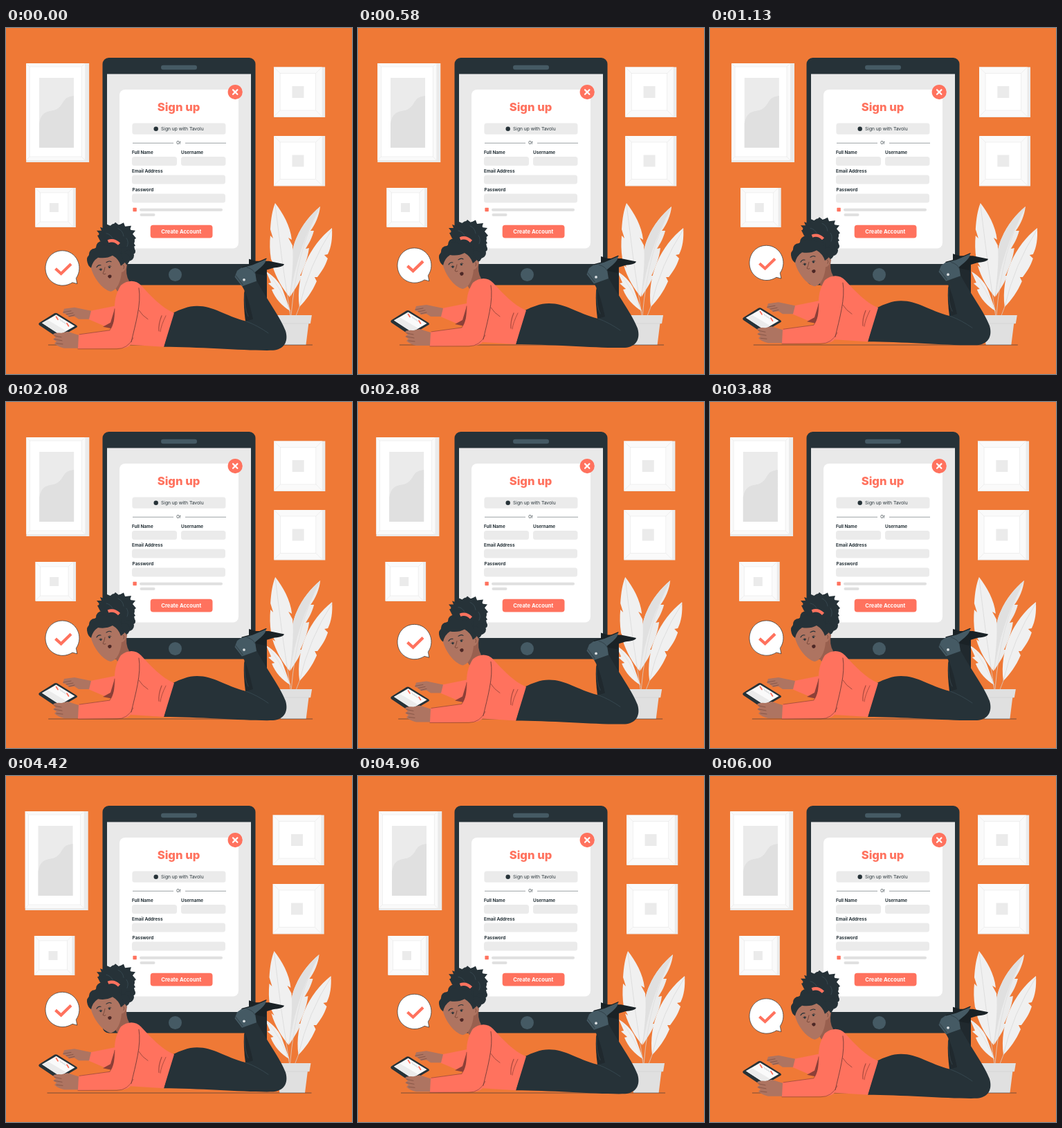
An HTML page with a canvas that plays this animation: 500x500 px, repeating every 6040 ms.

```html
<!DOCTYPE html>
<html lang="en">
<head>
<meta charset="utf-8">
<title>Sign up</title>
<style>
html, body { margin: 0; width: 100%; height: 100%; overflow: hidden; background: #ef7936; }
canvas, svg { position: absolute; left: 0; top: 0; width: 500px; height: 500px; }
text { font-family: Inter, "Open Sans", sans-serif; font-size: 6.4px; font-weight: 700; fill: #263238; }
.title { font-size: 16.6px; font-weight: 800; fill: #ff725e; }
.light { font-size: 6.7px; font-weight: 400; }
.button { font-size: 7.6px; font-weight: 700; fill: #fff; }
.mid { text-anchor: middle; }
</style>
</head>
<body>
<canvas id="stage"></canvas>
<svg viewBox="0 0 500 500">
  <text class="title mid" x="249.5" y="119.6">Sign up</text>
  <text class="light" x="224" y="147.8">Sign up with Tavolu</text>
  <text class="light mid" x="249.5" y="168" style="font-size:5.8px">Or</text>
  <text x="182" y="181.6">Full Name</text>
  <text x="253" y="181.6">Username</text>
  <text x="182" y="209.2">Email Address</text>
  <text x="182.6" y="236">Password</text>
  <text class="button mid" x="253.3" y="296.6">Create Account</text>
</svg>
<script>
const LOOP = 6040, CYCLE = 6000, LEAD = 30;
const DARK = '#263238', SLATE = '#455a64', CORAL = '#ff725e', SKIN = '#ae7461';
const LIGHT = '#ebebeb', GREY = '#e0e0e0', WHITE = '#fff';

const canvas = document.getElementById('stage');
const ctx = canvas.getContext('2d');
const dpr = window.devicePixelRatio || 1;
canvas.width = canvas.height = 500 * dpr;

const cache = {};
const path = d => cache[d] || (cache[d] = new Path2D(d));

function fill(d, color) {
  ctx.fillStyle = color;
  ctx.fill(path(d));
}

function line(d, color, width = 0.6, cap = 'round') {
  ctx.strokeStyle = color;
  ctx.lineWidth = width;
  ctx.lineCap = cap;
  ctx.stroke(path(d));
}

function box(x1, y1, x2, y2, color, r = 0) {
  ctx.fillStyle = color;
  ctx.beginPath();
  ctx.roundRect(x1, y1, x2 - x1, y2 - y1, r);
  ctx.fill();
}

function dot(x, y, r, color) {
  ctx.fillStyle = color;
  ctx.beginPath();
  ctx.arc(x, y, r, 0, Math.PI * 2);
  ctx.fill();
}

// Sideways shake: one stop per tenth of the cycle.
const SWAY = [0, -1, 2, -4, 4, -4, 4, -4, 2, -1, 0];
function swayAt(p) {
  const i = Math.floor(p * 10);
  return SWAY[i] + (SWAY[i + 1] - SWAY[i]) * (p * 10 - i);
}

// Linear rise and fall, twice per cycle.
const floatAt = p => -10 * (1 - Math.abs(1 - 2 * ((p * 2) % 1)));

function shifted(dx, dy, draw) {
  ctx.save();
  ctx.translate(dx, dy);
  draw();
  ctx.restore();
}

function pictureFrame(x, y, w, h, side, base, inset) {
  box(x, y, x + w, y + h, LIGHT);
  box(x, y, x + w - side, y + h - base, '#fafafa');
  const r = x + w - side, b = y + h - base;
  box(x + inset, y + inset, r - inset, b - inset, WHITE);
  ctx.strokeStyle = '#e6e6e6';
  ctx.lineWidth = 0.6;
  ctx.strokeRect(x + inset, y + inset, r - x - 2 * inset, b - y - 2 * inset);
  ctx.beginPath();
  for (const [cx, cy, sx, sy] of [[x, y, 1, 1], [r, y, -1, 1], [x, b, 1, -1], [r, b, -1, -1]]) {
    ctx.moveTo(cx, cy);
    ctx.lineTo(cx + sx * inset, cy + sy * inset);
  }
  ctx.stroke();
}

function drawPictures() {
  pictureFrame(29.2, 51, 91, 143, 6, 3, 5);
  box(48, 72, 98, 173, LIGHT);
  fill('M48 173V138C50 125 56 121 66 119.5C78 118 80 110 84 105C88 99 93 99 98 98V173Z', GREY);
  for (const y of [56.5, 156]) {
    pictureFrame(387.2, y, 74, 72.5, 4.5, 1, 9);
    box(413.5, y + 27.5, 430.5, y + 44.5, LIGHT);
  }
  pictureFrame(42.4, 231, 58.5, 57, 4, 1, 7);
  box(63, 253, 76, 266, LIGHT);
}

function drawPlant() {
  fill('M376 352C388 359 398 370 402 384L411 409C399 402 389 391 384 378L388 377L379 369L383 368Z', '#f0f0f0');
  line('M379 355Q398 376 411 411', '#d6d6d6', 0.5);
  fill('M411 388C408 352 412 320 420 303C428 284 441 269 454 258C453 270 447 284 440 293L445 293C442 304 438 311 433 319L438 318C436 333 431 346 425 358L428 358C423 370 417 378 411 388Z', LIGHT);
  fill('M411 388C408 352 412 320 420 303C428 284 441 269 454 258C430 302 417 345 411 388Z', GREY);
  line('M453 260Q420 320 412 416', '#dcdcdc', 0.7);
  fill('M389 253C400 267 411 286 413 306L408 303L414 314C416 338 413 362 410 389C400 377 390 361 385 343L389 346L383 334C381 322 381 310 382 300L386 304L382 291C383 275 385 263 389 253Z', '#f0f0f0');
  line('M389 255Q398 335 411 416', '#d6d6d6', 0.7);
  fill('M424 403C421 380 425 358 433 339C442 318 455 302 471 289C472 304 470 317 465 327L460 328L465 333C461 345 456 352 450 360L446 360L449 366C442 382 434 393 424 403Z', '#f0f0f0');
  line('M471 291Q438 342 424 403L419 416', '#d6d6d6', 0.7);
  fill('M391 426H437.5L433.5 458H397Z', GREY);
  fill('M388 415H442L440 427H390Z', GREY);
  line('M391 427H439', '#cfcfcf', 0.6);
  line('M61 458H443', DARK, 0.6, 'butt');
}

function drawDevice() {
  box(139.5, 43, 360.5, 371.5, DARK, 9);
  box(224, 53.7, 276, 60.3, SLATE, 3.3);
  box(146, 66.4, 354, 341, '#e9e9e9');
  dot(244.5, 356.5, 9.5, SLATE);
  box(164, 89, 336, 318.5, WHITE, 8);
  dot(331.2, 92.6, 10.6, CORAL);
  line('M328 89.4L334.4 95.8M334.4 89.4L328 95.8', WHITE, 2.2);
  box(182.4, 137.5, 317.5, 153.7, LIGHT, 3.5);
  dot(216.7, 145.8, 3.2, DARK);
  line('M183 166.3H242M259 166.3H318', '#747c80', 0.7, 'butt');
  box(182, 186, 247, 199, LIGHT, 3.5);
  box(253, 186, 317.5, 199, LIGHT, 3.5);
  box(182, 212.5, 317, 225.5, LIGHT, 3.5);
  box(182, 239.5, 317, 252.5, LIGHT, 3.5);
  box(183.4, 259.8, 188.8, 265.2, CORAL, 0.6);
  box(193, 260.8, 313, 264.8, GREY, 2);
  box(193.5, 268, 215.5, 272, GREY, 2);
  box(208.7, 284.7, 298.5, 303.4, CORAL, 4);
}

function drawBubble() {
  const d = 'M101.5 361.5C113 344.5 101 322 81.5 322C67 322 57 333.5 57 347.5C57 361.5 68 372.3 82 372.3C87 372.3 92 370.5 96 368L102.5 369.7Z';
  fill(d, WHITE);
  line(d, DARK, 0.7);
  line('M71.5 348L79.6 355.2L94 341.2', CORAL, 4.2, 'butt');
}

function drawLegs() {
  fill('M344 384L350 352L377 348L377 436L346 424Q343 402 344 384Z', '#20292e');
  fill('M351 334L361 337L380 337L402 341.5C401 345 394 346 386 347L376 350L375 358L351 353Z', '#1a2226');
  fill('M241 412C252 407 263 402 276 402C300 402 316 416 347 424L357 421C353 403 349 386 341 373L362 365C375 389 398 421 404 438C409 455 400 465 386 466C350 467 278 461 228 461Z', DARK);
  line('M347 424C358 428 369 434 379 441', SLATE, 0.5);
  line('M345 384Q344 406 350 417', SLATE, 0.5);
  fill('M330.5 360L334 351L341 346L356 342L376 333.5C376 339 371 344 366 348L360 353L362 366L341 373.5Z', SLATE);
  line('M332 358L342 371', '#37474f', 1.4);
  line('M341 346L356 342L376 333.5', '#1a2226', 1.3);
  line('M348 346Q358 349 360 355', DARK, 0.6);
  dot(344, 364, 1.9, '#dce1e3');
}

function drawSweater() {
  fill('M122 409L157 402L158 436L140 430L119 421Z', CORAL);
  fill('M157 406L151 426L140 432L155 435Z', '#8d4038');
  fill('M166 372C175 364 188 364 195 372C210 388 224 404 243 412L228 461L180 458C175 463 169 463 160 463L104 464Q102 453 105 443L150 437C155 430 158 418 157 404C157 390 161 380 166 372Z', CORAL);
  line('M192 376C196 398 187 428 181 454', '#4a2d2c', 0.7);
  line('M106 443L150 437Q157 427 157 406', '#7b3a33', 0.6);
  line('M104 464H160Q176 464 184 448', '#7b3a33', 0.6);
  line('M192 408Q197 416 205 421', '#8d4038', 0.8);
  line('M225 416Q220 428 221 438', '#a94a3e', 1.2);
  line('M231 416Q224 430 223 439', '#a94a3e', 0.9);
}

function drawPad() {
  fill('M84 406L99 404L123 409L120 421L105 421L99 417L91 418L87 414L82 412Z', SKIN);
  line('M83 411L94 409M87 414L97 412M91 417L99 415', '#6f4438', 0.6);
  fill('M48.5 426L70 412.5Q72 411.5 74 412.5L102 430Q104 432 102 433L79 446.5Q76 448 73 446.5L48.5 430Q46 428 48.5 426Z', DARK);
  fill('M52 426.5L72.5 414.5L99.5 431L78 443.5Z', '#fafafa');
  fill('M52 426.5L60 422L87 438L78 443.5Z', LIGHT);
  line('M72.5 417.5L75 421.5M88 427L90.5 431', CORAL, 1.8);
  line('M78 421L80 424M81 423L83 426M84 425L86 428', '#b8bec1', 0.7);
  fill('M68 443Q70 440 80 441L89 439L105 444L104 463L84 463Q75 461 70 456L73 453L68 450L72 447Z', SKIN);
  line('M70 445L80 447M70 450L81 452M73 456L82 457', '#6f4438', 0.6);
}

// Curls as x, y, radius.
const CURLS = [
  [128, 327, 8], [122, 334, 5], [139, 317, 9], [150, 318, 11], [164, 320, 12],
  [176, 320, 10], [177, 329, 8], [170, 334, 9], [183, 323, 4], [123, 340, 4],
  [141, 300, 7], [148, 294, 8], [157, 291, 8], [166, 291, 7],
  [174, 295, 7], [179, 308, 7], [169, 304, 12], [156, 299, 12]
];
const STRANDS = 'M136 308L132 300L136 299L131 293L138 293L136 288L145 291L146 284L153 287L158 281L163 285L170 281.5L172 287L181 286L179 292L187 293L183 298L188 304L183 308L187 315L181 318L150 318Z';

function drawHead() {
  fill('M163 344L175 342Q172 356 178 366Q171 371 161 381L153 368Z', '#99604f');
  for (const [x, y, r] of CURLS) dot(x, y, r, DARK);
  fill(STRANDS, DARK);
  fill('M122 343C123 332 132 328 143 326C155 325 163 332 166 341C171 336 176 341 173 347C172 351 169 353 167 353C166 367 160 380 151 381C139 378 125 360 122 343Z', SKIN);
  fill('M117 336Q120 321 137 314L163 317L171 340L166 344Q163 334 154 329Q145 334 133 332Q125 337 123 347Q118 344 117 336Z', DARK);
  line('M147.5 308.5Q156 305 163.5 312.5', CORAL, 4.4, 'butt');
  line('M131 346Q133 342 137 343M145 339Q149 336 152 338', DARK, 1.1);
  dot(137, 349.5, 1.4, DARK);
  dot(149.5, 346, 1.4, DARK);
  line('M134.5 349Q137 346.5 139 348.5M147.5 345Q150 342.5 152 344.5', DARK, 0.7);
  line('M143 346Q142 352 140 355Q142 357 144 355.5', '#6b3f34', 0.8);
  fill('M147 358.5Q150 355 152.5 358Q153 361.5 149.5 362Q147 361 147 358.5Z', '#4d2826');
  line('M169 343Q172 343 170 348', '#6b3f34', 0.7);
  line('M162 290Q169 293 170 301M145 297Q151 298 154 304M174 304Q178 309 175 316', SLATE, 0.5);
}

function drawPerson() {
  drawBubble();
  drawLegs();
  drawHead();
  drawSweater();
  drawPad();
}

function render(now) {
  const p = ((now % LOOP + LEAD) / CYCLE) % 1;
  ctx.setTransform(dpr, 0, 0, dpr, 0, 0);
  box(0, 0, 500, 500, '#ef7936');
  shifted(swayAt(p), 0, () => {
    drawPictures();
    drawPlant();
  });
  drawDevice();
  shifted(0, floatAt(p), drawPerson);
  requestAnimationFrame(tick);
}

let start = null;
function tick(now) {
  if (start === null) start = now;
  render(Math.max(0, now - start));
}
tick(performance.now());
</script>
</body>
</html>
```
